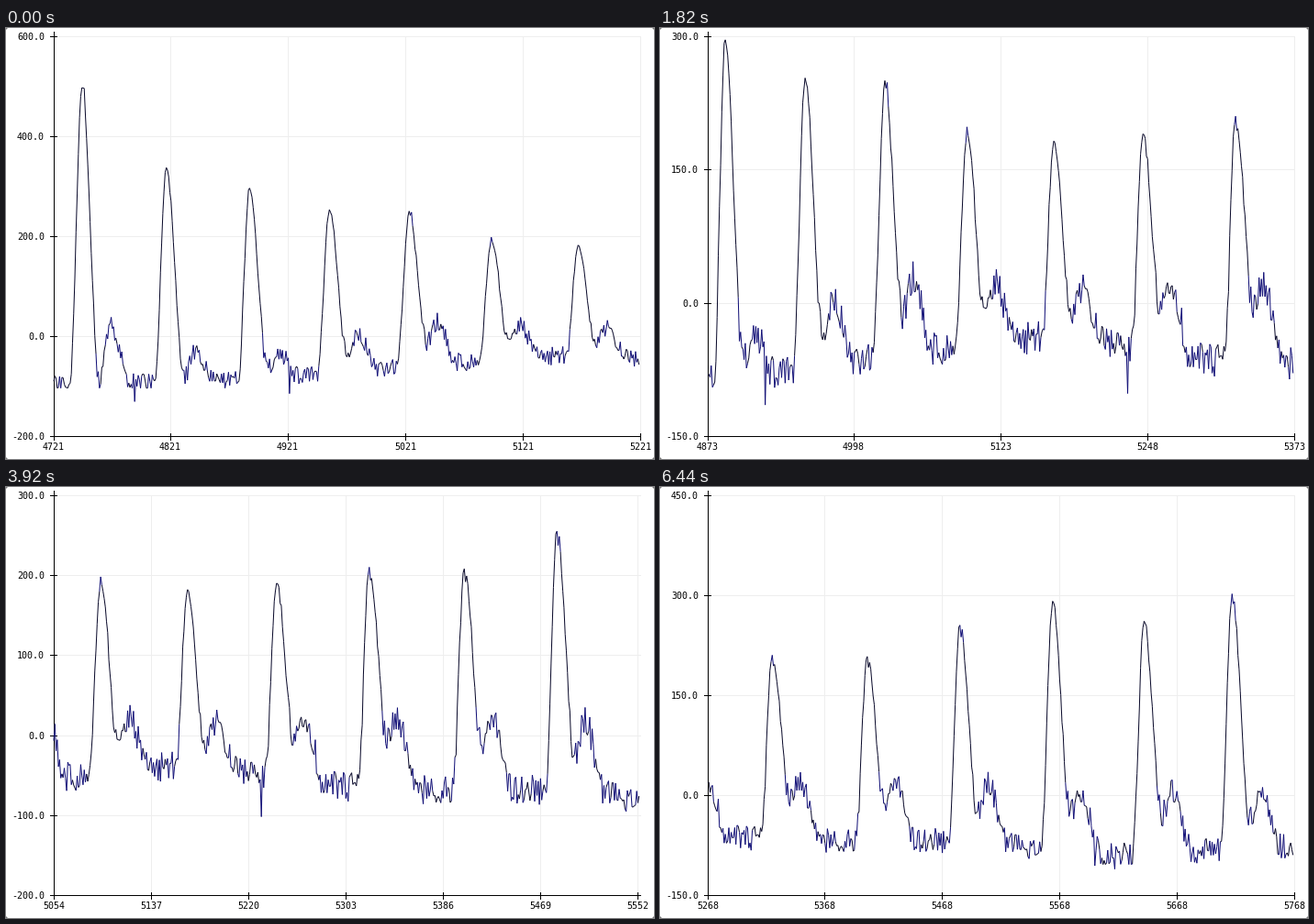
A matplotlib script that plays this animation: 706x470 px, repeating every 6510 ms.

```python
import math

import matplotlib.pyplot as plt
import numpy as np
from matplotlib.animation import FuncAnimation
from matplotlib.collections import LineCollection

W, H, DPI = 706, 470, 100
FRAMES, INTERVAL = 93, 70
LEFT, RIGHT, TOP, BOTTOM = 52, 691, 9, 445
FIRST, WINDOW, TOTAL = 4721, 500, 1047
UNIT = (RIGHT - LEFT) / WINDOW
PX = 72 / DPI

# Time and height of each beat, and the deepest dips between them.
PEAKS = [(24, 497), (96, 337), (167, 296), (235, 253), (303, 250),
         (373, 198), (447, 182), (523, 190), (602, 210), (683, 208),
         (762, 255), (841, 291), (919, 261), (994, 302)]
DIPS = [(69, -131), (201, -115), (510, -102), (877, -106), (894, -111)]

# Slow drift of the levels around a beat, at evenly spaced times.
DRIFT_T = np.linspace(0, 1050, 8)
LOW = [-95, -90, -60, -35, -68, -68, -90, -75]
TROUGH = [-95, -80, -15, -20, 0, -28, -28, -38]
BUMP = [60, -50, 30, 18, 22, 24, 4, 10]

# Scroll position at a few frames.
PACE = [0, 17, 35, 47, 64, 79, 92]
STARTS = [0, 98, 205, 280, 381, 469, 547]


def drift(t, levels):
    return np.interp(t, DRIFT_T, levels)


def eased(t, knots):
    kt, ky = np.array(knots, float).T
    k = np.clip(np.searchsorted(kt, t, side="right") - 1, 0, len(kt) - 2)
    u = (t - kt[k]) / (kt[k + 1] - kt[k])
    return ky[k] + (ky[k + 1] - ky[k]) * u * u * (3 - 2 * u)


def make_signal():
    knots = [(0, LOW[0])]
    for t, height in PEAKS:
        knots += [(t - 10, drift(t - 10, LOW)),
                  (t, height),
                  (t + 15, drift(t + 15, TROUGH)),
                  (t + 24, drift(t + 24, BUMP)),
                  (t + 41, drift(t + 41, LOW))]
    knots.append((TOTAL, LOW[-1]))

    base = eased(np.arange(TOTAL), knots)
    noise = np.random.default_rng(7).uniform(-19, 19, TOTAL)
    y = np.maximum(base + noise * np.where(base < 35, 1, 0.4), -104)
    for t, height in PEAKS:
        y[t - 1:t + 3] = height - np.abs(noise[t - 1:t + 3])
        y[t] = height
    for t, level in DIPS:
        y[t] = level
    return y


def zigzag_colors(y):
    """Blue where the line turns sharply, almost black elsewhere."""
    d = np.diff(y)
    sharp = np.pad((d[:-1] * d[1:] < 0) & (np.abs(np.diff(d)) > 24), 1)
    blue = sharp[:-1] | sharp[1:]
    return np.where(blue[:, None], [[0.06, 0.05, 0.46]], [[0.03, 0.03, 0.16]])


def scale(y):
    step = 50 * math.ceil((y.max() - y.min()) / 200)
    return step * math.floor(y.min() / step), step * math.ceil(y.max() / step), step


signal = make_signal()
stroke = zigzag_colors(signal)

fig = plt.figure(figsize=(W / DPI, H / DPI), dpi=DPI, facecolor="white")
ax = fig.add_axes([0, 0, 1, 1])
ax.set_xlim(0, W)
ax.set_ylim(H, 0)
ax.axis("off")


def add_lines(color, z):
    lines = LineCollection([], colors=color, linewidths=PX, zorder=z, snap=False)
    ax.add_collection(lines, autolim=False)
    return lines


def add_labels(count, align):
    return [ax.text(0, 0, "", family="DejaVu Sans Mono", size=10 * PX,
                    ha=align, va="baseline") for _ in range(count)]


grid = add_lines("#eeeeee", 1)
axes = add_lines("black", 2)
trace = add_lines("black", 3)
y_labels = add_labels(8, "right")
x_labels = add_labels(8, "center")

for cx, dx in ((0, 2), (W, -2)):
    for cy, dy in ((0, 2), (H, -2)):
        ax.fill([cx, cx + dx, cx], [cy, cy, cy + dy], color="#777777", lw=0)


def across(y, x0, x1):
    return [(x0, y + 0.5), (x1, y + 0.5)]


def down(x, y0, y1):
    return [(x + 0.5, y0), (x + 0.5, y1)]


def put(labels, items):
    for label in labels:
        label.set_text("")
    for label, (x, y, text) in zip(labels, items):
        label.set_position((x, y))
        label.set_text(text)


def draw(frame):
    start = int(round(np.interp(frame, PACE, STARTS)))
    y = signal[start:start + WINDOW]
    lo, hi, step = scale(y)
    rows = (hi - lo) // step
    gap = WINDOW // (rows + 1)

    ys = [round(BOTTOM - (BOTTOM - TOP) * i / rows) for i in range(rows + 1)]
    xs = [math.floor(LEFT + UNIT * gap * i) for i in range(rows + 2)]

    grid.set_segments([across(v, LEFT, RIGHT + 1) for v in ys]
                      + [down(u, TOP, BOTTOM) for u in xs])
    axes.set_segments([down(LEFT, 4, BOTTOM + 1), across(BOTTOM, LEFT, RIGHT + 1)]
                      + [across(v, 48, 56) for v in ys]
                      + [down(u, 442, 450) for u in xs])

    put(y_labels, [(42, v + 4, f"{lo + i * step:.1f}") for i, v in enumerate(ys)])
    put(x_labels, [(u, 460, str(FIRST + start + i * gap))
                   for i, u in enumerate(xs)])

    px = LEFT + UNIT * np.arange(WINDOW)
    py = BOTTOM - (y - lo) / (hi - lo) * (BOTTOM - TOP)
    pts = np.column_stack([px, py])
    trace.set_segments(np.stack([pts[:-1], pts[1:]], axis=1))
    trace.set_color(stroke[start:start + WINDOW - 1])
    return [grid, axes, trace, *y_labels, *x_labels]


anim = FuncAnimation(fig, draw, frames=FRAMES, interval=INTERVAL,
                     repeat=True, repeat_delay=0, blit=False)
plt.show()
```
